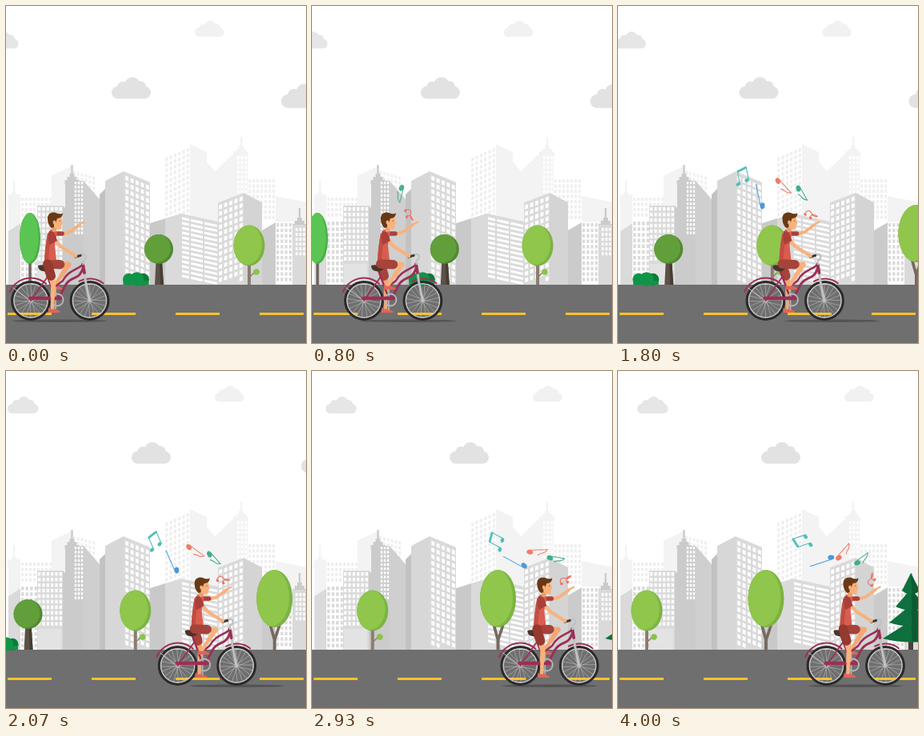
These frames come from a looping animation (375 by 422 pixels, 4.07 s). An HTML page with a canvas:

```html
<!DOCTYPE html>
<html lang="en">
<head>
<meta charset="utf-8">
<title>City bike ride</title>
<style>
html, body { margin: 0; width: 100%; height: 100%; overflow: hidden; background: #fff; }
canvas { display: block; width: 375px; height: 422px; }
</style>
</head>
<body>
<canvas id="stage"></canvas>
<script>
const W = 375, H = 422, LOOP = 4070, GROUND = 349, TAU = Math.PI * 2;
const DPR = window.devicePixelRatio || 1;
const stage = document.getElementById('stage');
let c;

function setup(canvas) {
  canvas.width = W * DPR;
  canvas.height = H * DPR;
  const ctx = canvas.getContext('2d');
  ctx.scale(DPR, DPR);
  ctx.lineCap = ctx.lineJoin = 'round';
  return ctx;
}

// ease-in-out, the cubic curve (.42, 0, .58, 1)
function ease(p) {
  if (p <= 0) return 0;
  if (p >= 1) return 1;
  let lo = 0, hi = 1, s;
  for (let i = 0; i < 22; i++) {
    s = (lo + hi) / 2;
    const x = 1.26 * s * (1 - s) ** 2 + 1.74 * s * s * (1 - s) + s ** 3;
    if (x < p) lo = s; else hi = s;
  }
  return s * s * (3 - 2 * s);
}
const radians = deg => deg * Math.PI / 180;
const mix = (a, b, p) => a.map((v, i) => v + (b[i] - v) * p);

// ---- drawing helpers ----
function rect(color, x, y, w, h) {
  c.fillStyle = color;
  c.fillRect(x, y, w, h);
}
function oval(color, x, y, rx, ry = rx, turn = 0) {
  c.fillStyle = color;
  c.beginPath();
  c.ellipse(x, y, rx, ry, turn, 0, TAU);
  c.fill();
}
function line(color, width, ...points) {
  c.strokeStyle = color;
  c.lineWidth = width;
  c.beginPath();
  for (const p of points) c.lineTo(...p);
  c.stroke();
}
function arc(color, width, x, y, r, from = 0, to = 360) {
  c.strokeStyle = color;
  c.lineWidth = width;
  c.beginPath();
  c.arc(x, y, r, radians(from), radians(to));
  c.stroke();
}
function shape(color, d) {
  c.fillStyle = color;
  c.fill(new Path2D(d));
}
function curve(color, width, d) {
  c.strokeStyle = color;
  c.lineWidth = width;
  c.stroke(new Path2D(d));
}
function at(x, y, draw, turn = 0) {
  c.save();
  c.translate(x, y);
  c.rotate(turn);
  draw();
  c.restore();
}

// ---- city ----
// a wall whose roof line runs from (x, y) with the given slope
function wall(color, x, y, w, slope = 0) {
  shape(color, `M${x} ${y}l${w} ${w * slope}V${GROUND}H${x}Z`);
}
// rows of windows that follow the roof line
function panes(color, x, y, w, slope, pitch, bottom) {
  const cols = Math.round(w / pitch), step = w / cols, pane = step * .6, tall = step * .82;
  for (let i = 0; i < cols; i++) {
    const dx = (i + .2) * step;
    for (let py = y + 4 + slope * dx; py + tall < bottom; py += step * 1.3)
      shape(color, `M${x + dx} ${py}l${pane} ${slope * pane}v${tall}l${-pane} ${-slope * pane}Z`);
  }
}
// a corner block: roof rises to the ridge and falls behind it
function block(left, right, x, ridge, end, top, rise = .42, fall = rise) {
  wall(left, x, top + (ridge - x) * rise, ridge - x, -rise);
  wall(right, ridge, top, end - ridge, fall);
}
function spire(color, x, top, base, half) {
  rect(color, x - 1.2, top, 2.4, base - top);
  for (let i = 1; i <= 3; i++) rect(color, x - half * i / 3, base - 15 + i * 4, half * i / 1.5, 5);
}
function city() {
  const far = '#f3f3f3', faint = '#efefef', mid = '#dadada', dark = '#cbcbcb', glass = '#fff';

  spire(far, 10, 218, 244, 8);
  wall(far, 3, 236, 15);
  panes(faint, 18, 236, 40, 0, 5, 270);
  block(far, glass, 57, 83, 112, 200, .48, .28);
  panes(faint, 83, 202, 29, .28, 5, 250);
  panes(faint, 198, 187, 32, -.44, 5.4, 275);
  shape(far, 'M230 173L251 183V195L261 207L284 185V349H230Z');
  spire(far, 294, 164, 186, 9);
  wall(far, 284, 182, 18);
  panes(glass, 288, 184, 14, 0, 4.5, 240);
  panes(faint, 302, 213, 35, 0, 5, 272);
  wall(far, 337, 238, 38, .2);

  wall(glass, 18, 268, 22);
  panes(mid, 18, 266, 22, 0, 5.4, 347);
  wall(mid, 3, 282, 15, -.65);
  spire(dark, 82.5, 199, 221, 9);
  wall(dark, 74, 219, 23);
  panes(glass, 85, 216, 12, 0, 4.2, 287);
  wall('#cfcfcf', 97, 219, 20, 1.15);
  wall(mid, 39, 250, 32);
  panes(glass, 39, 248, 32, 0, 5.2, 319);
  rect('#e3e3e3', 40, 323, 29, 26);
  wall(dark, 71, 250, 13, 1);

  wall('#c2c2c2', 117, 236, 7, -1);
  block('#d7d7d7', mid, 124, 147, 180, 207, .52, .42);
  panes(glass, 148, 208, 32, .42, 6.4, 347);

  wall('#c9c9c9', 180, 272, 19, -.31);
  block(mid, mid, 199, 219, 265, 260, .3, .22);
  for (let y = 264; y < 342; y += 6)
    for (const [x, w] of [[220, 9], [231, 15], [248, 16]]) {
      const drop = (x - 219) * .22;
      shape(glass, `M${x} ${y + drop}l${w} ${w * .22}v3.2l${-w} ${-w * .22}Z`);
    }

  block(mid, '#d4d4d4', 265, 297, 320, 234, .38, .52);
  panes(glass, 265, 246, 32, -.38, 6.4, 347);
  wall(glass, 337, 270, 21);
  panes(mid, 337, 268, 21, 0, 5.2, 347);
  wall(dark, 320, 281, 17, -.59);
  spire(dark, 367, 253, 276, 9);
  wall(mid, 358, 274, 17);
  panes(glass, 361, 274, 14, 0, 4.5, 318);

  rect('#6f6f6f', 0, GROUND, W, H - GROUND);
  for (let x = 2; x < W; x += 105) rect('#fbc22e', x, 384, 55, 3);
}

function cloud(color, x, y, w) {
  at(x, y, () => {
    c.scale(w / 49, w / 49);
    c.fillStyle = color;
    c.beginPath();
    c.roundRect(0, 11.5, 49, 15.5, 7.7);
    c.fill();
    oval(color, 14, 12, 6.5);
    oval(color, 26, 9.5, 9.5);
    oval(color, 36, 12, 7);
  });
}

// ---- plants, drawn around the foot of the trunk ----
function crown(light, shade, y, rx, ry) {
  c.save();
  oval(shade, 0, y, rx, ry);
  c.clip(new Path2D(`M${-rx} ${y}a${rx} ${ry} 0 0 1 ${2 * rx} 0a${rx} ${ry} 0 0 1 ${-2 * rx} 0Z`));
  oval(light, -rx * .18, y - 1.5, rx, ry);
  c.restore();
}
const LEAF = '#8fc64b', LEAF_SHADE = '#7cb342';
const plants = {
  slim() {
    rect('#6d625a', -1.7, -32, 3.4, 32);
    crown('#5ac552', '#4aae49', -58, 13, 32);
  },
  bush() {
    for (const x of [-9, 9, 1]) {
      const r = 9 - Math.abs(x) / 6;
      oval(x > 1 ? '#0b7b3a' : '#109447', x, r - 16 + Math.abs(x) / 5, r);
    }
    rect('#109447', -16, -5, 32, 5);
  },
  round() {
    shape('#5b5145', 'M-3.5-30H4L6 0H-5Z');
    shape('#463e34', 'M1-30H4L6 0H2Z');
    crown('#619f3a', '#518930', -44.5, 18, 18.5);
  },
  egg() {
    const bark = '#8c7d70';
    rect(bark, -2, -30, 4, 30);
    line(bark, 1.5, [1, -10], [7, -16]);
    oval('#8bc34a', 9, -16, 3.8);
    crown(LEAF, LEAF_SHADE, -49, 19.5, 25.5);
  },
  tall() {
    for (const x of [-5, 6]) line('#76695e', 3.6, [0, 0], [0, -12], [x, -30]);
    crown(LEAF, LEAF_SHADE, -64, 22.5, 36);
  },
  pine() {
    rect('#4d4036', -3, -12, 6, 12);
    for (let i = 4; i > 0; i--) {
      const half = 3 + 8 * i, y = 20 * i - 94, top = y - 22;
      shape('#0f6f3e', `M0 ${top}L${half} ${y}Q0 ${y + 9} ${-half} ${y}Z`);
      shape('#0b5b33', `M0 ${top}L${half} ${y}Q${half / 2} ${y + 5} 2 ${y + 4}Z`);
    }
  }
};
const grove = [
  { kind: 'slim', from: 30, to: -252 },
  { kind: 'bush', from: 162.5, to: -145.5 },
  { kind: 'round', from: 191, to: -117 },
  { kind: 'egg', from: 304, to: 36 },
  { kind: 'tall', from: 506, to: 185 },
  { kind: 'pine', from: 605, to: 366 }
];

// ---- music notes, drawn along the x axis around their middle ----
function single(color, len, flag) {
  const x = -len / 2, tip = len / 2 + 2;
  oval(color, x, 0, 4, 2.9, .3);
  line(color, 1, [x, -2.4], [tip, -2.4]);
  if (flag) curve(color, 1.1, `M${tip} -2.4C${tip - 4} 4 ${tip - 8} 0 ${tip - 12} 4`);
}
function pair(color) {
  line(color, 1.1, [-3.8, 8], [-4.5, -7]);
  line(color, 1.1, [7.7, 4.5], [7, -11]);
  line(color, 2.8, [-4, -7.5], [6.4, -10.8]);
  for (const x of [-6, 5.5]) oval(color, x, 6.7 - x * .3, 2.9, 2.2, -.4);
}
function swirl(color) {
  for (const x of [-6, 2]) oval(color, x, 3.5, 1.9, 1.4);
  curve(color, 1.1, 'M-7 3C-7-4-3-4 0-2S5 0 8-3M1 4C0-2 3-3 8-3');
}
const SPIN = -44; // degrees per second
const notes = [
  { x: 87.5, y: 261.5, angle: 7, draw: () => swirl('#ec6f5e') },
  { x: 76, y: 235.5, angle: 34, draw: () => single('#3fae8a', 16, true) },
  { x: 53, y: 226.5, angle: 22, draw: () => single('#ef7d68', 20, true) },
  { x: 24.5, y: 237.5, angle: -128, draw: () => single('#4a99dc', 26, false) },
  { x: 1.5, y: 214, angle: -35, draw: () => pair('#4fbfb8') }
];
function drawNotes(t) {
  notes.forEach(({ x, y, angle, draw }, i) => {
    c.globalAlpha = Math.max(0, Math.min(1, (t - 200 - 290 * i) / 330));
    at(x, y, draw, radians(angle + SPIN * (t - 2400) / 1000));
  });
  c.globalAlpha = 1;
}

// ---- bicycle ----
const RED = '#9c2f56', STEEL = '#bfc3c4', SKIN = '#f8b27d';
const RADIUS = 24.5, REAR = [31, 369], FRONT = [104.5, 369], CRANK = [62, 366], SEAT = [49, 331];

function wheel([x, y], turn) {
  const spokes = 20;
  at(x, y, () => {
    for (let i = 0; i < spokes; i++) {
      const a = i * TAU / spokes, b = a + (i % 2 ? .5 : -.5);
      line('rgba(200,200,200,.75)', .65,
        [2 * Math.cos(b), 2 * Math.sin(b)], [21 * Math.cos(a), 21 * Math.sin(a)]);
    }
  }, turn);
  oval('#b5b5b5', x, y, 2.4);
  arc('#c9c9c9', 1.6, x, y, 21.2);
  arc('#2d2929', 3, x, y, RADIUS - 1.1);
}
function bikeFrame() {
  arc(RED, 2, ...REAR, 28.5, 203, 312);
  arc(RED, 2, ...FRONT, 27.5, 242, 308);
  line(STEEL, 1, REAR, [9, 353]);
  line(RED, 1.8, REAR, [52, 339]);
  line(RED, 2.4, SEAT, CRANK);
  curve(RED, 3, 'M97 326C91 346 82 336 74 350Q68 364 62 366');
  curve(RED, 2.6, 'M96 324C88 331 78 331 71 344L58 354');
  line(STEEL, 3, [97, 326], [99.5, 345], FRONT);
  line(RED, 3.8, [96, 323], [98, 334]);
  curve(STEEL, 2.4, 'M96.5 323V319C103 315 99 308 94 312L88 314');
  line('#46382f', 3.2, [87, 314], [93, 312.5]);
  shape('#4b332a', 'M40 325Q48 323 57 327Q53 334 46 332Q40 331 40 325Z');
}
function chain() {
  const [x, y] = CRANK;
  arc('#b9b9b9', 1.8, x + 2, y + 2, 7.5);
  line('#b2b2b2', 1.8, [x, y - 14], [x, y + 14]);
  line(RED, 4.5, [REAR[0] - 1, y], [x + 6, y]);
}

// ---- rider ----
const HIP = [52, 323], PEDAL_UP = [61, 350], PEDAL_DOWN = [58, 379], STRIDE = 600;

function leg(foot, shorts, skin) {
  const thigh = 26, shin = 31;
  const dx = foot[0] - HIP[0], dy = foot[1] - HIP[1];
  const reach = Math.min(Math.hypot(dx, dy), thigh + shin - .1);
  const bend = Math.acos((thigh ** 2 + reach ** 2 - shin ** 2) / (2 * thigh * reach));
  const dir = Math.atan2(dy, dx) - bend;
  const knee = [HIP[0] + thigh * Math.cos(dir), HIP[1] + thigh * Math.sin(dir)];
  const calf = mix(knee, foot, .5);
  line(skin, 7, mix(HIP, knee, .5), knee);
  line(skin, 5.8, knee, calf);
  line(skin, 4.4, calf, foot);
  line(shorts, 11.5, HIP, mix(HIP, knee, .6));
  shape('#df6658', `M${foot[0] - 5} ${foot[1] - 1}q4 3 8 1l7 3.5l-1 1.5h-14Z`);
}
function torso() {
  shape('#d95d4f', 'M56 280Q62 279 64 284L61 300L63 318L48 319Q49 300 52 285Z');
  shape('#c24d43', 'M52 285Q49 300 48 319H53Q54 301 57 288Z');
}
function farArm() {
  line(SKIN, 4, [69, 286], [80, 283], [92, 274]);
  line(SKIN, 2.4, [92, 273.5], [98, 270.5]);
  line('#aa4039', 5.5, [61, 285], [70, 285]);
}
function nearArm() {
  line(SKIN, 4.4, [59, 290], [68, 301], [87, 313]);
  shape('#a94039', 'M54 282Q60 281 62 288L64 294L55 299Q51 291 54 282Z');
}
function head() {
  line('#e9a06d', 6, [60.5, 274], [60.5, 280]);
  shape(SKIN, 'M58 264H69L71 273L69.5 274L69 279Q65 281 60 277Z');
  shape('#693915', 'M52 266C52 258 60 257 65 260Q70 261 71 259Q71 266 64 266L62 272L60 271V277L57 278Q52 274 52 266Z');
  oval(SKIN, 60.5, 271, 1.9, 2.4);
  oval('#4a2a18', 67.3, 269, .6);
}
function ride(travel, t) {
  const shift = 229.5 * travel, turn = shift / RADIUS;
  // the legs change places at each stride until the bike halts
  const nearUp = t < 3000 && Math.floor(t / STRIDE) % 2 === 1;
  at(shift, 0, () => {
    wheel(REAR, turn);
    wheel(FRONT, turn);
    farArm();
    leg(nearUp ? PEDAL_DOWN : PEDAL_UP, '#a6433b', '#f3a873');
    bikeFrame();
    chain();
    torso();
    leg(nearUp ? PEDAL_UP : PEDAL_DOWN, nearUp ? '#a6433b' : '#96392f', SKIN);
    head();
    nearArm();
    drawNotes(t);
  });
}

// ---- scene ----
const backdrop = document.createElement('canvas');
c = setup(backdrop);
city();
c = setup(stage);

function draw(t) {
  const drift = ease(t / 4000), sky = 47 * drift;
  rect('#fff', 0, 0, W, H);
  c.drawImage(backdrop, 0, 0, W, H);

  cloud('#e2e2e2', 132 + sky, 89, 49);
  cloud('#f1f1f1', 236 + sky, 18.5, 36.5);
  cloud('#e6e6e6', -23 + sky, 32, 38.5);
  cloud('#e2e2e2', 344 + sky, 97.5, 55);

  for (const { kind, from, to } of grove) at(from + (to - from) * drift, GROUND, plants[kind]);

  oval('rgba(45,45,45,.42)', 67 + 230 * ease(t / 2400), 394.3, 60, 1.7);
  ride(ease(t / 3000), t);
}

const begin = performance.now();
function tick() {
  draw((performance.now() - begin) % LOOP);
  requestAnimationFrame(tick);
}
tick();
</script>
</body>
</html>
```
